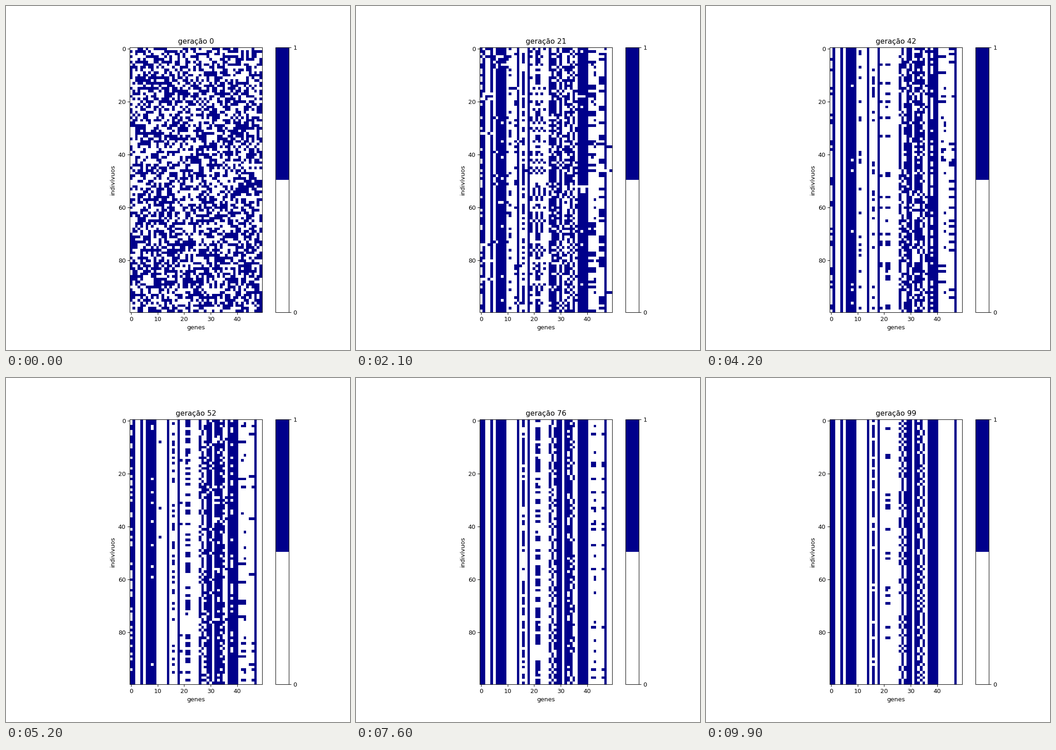
A matplotlib script that plays this animation: 748 by 748 pixels, repeating every 10000 ms.

```python
import numpy as np
import matplotlib.pyplot as plt
from matplotlib.animation import FuncAnimation
from matplotlib.colors import ListedColormap

SIZE, GENES, GENERATIONS = 100, 50, 100

# Generations at which the variant shares (in percent) are given.
KEYS = (13, 29, 42, 62, 76, 99)

# Linked genes: first gene, dominant variant (takes the remaining share),
# and the rival variants with their shares; missing values are zero.
LINKED = [
    (0, "11001", {"01001": (15, 60, 75, 18)}),
    (5, "011110", {"011010": (10, 5, 8), "101111": (5, 9)}),
    (11, "00010", {"10010": (25, 35, 17), "00110": (20, 12)}),
    (16, "10", {"00": (0, 60, 80, 50, 38, 15)}),
    (18, "10000000", {
        "10011000": (45, 15, 10, 67, 52, 20),
        "11011000": (0, 10, 12),
        "11010100": (25, 22),
        "10101010": (20, 11),
        "10010000": (0, 0, 3, 3, 5, 1),
    }),
    (26, "010110", {
        "101110": (10, 8, 25, 25, 33, 40),
        "100110": (5, 5, 20, 20, 17),
        "111010": (40, 45, 15),
        "011101": (15, 15, 8),
        "100101": (15, 15, 10),
    }),
    (32, "11010", {
        "10100": (10, 10, 10, 18, 20, 30),
        "11100": (10, 15, 25, 42, 45, 12),
        "11110": (20, 15, 25, 30, 5),
        "01010": (30, 30, 10),
        "00101": (15, 20, 15),
    }),
    (37, "1111", {"1011": (5, 5, 50, 15)}),
    (41, "000000", {
        "001000": (15, 5, 10, 20, 12),
        "011001": (0, 0, 4, 5, 10),
        "111000": (30, 20, 12),
        "010000": (0, 15, 8),
        "000011": (40, 20, 16),
    }),
    (47, "100", {}),
]

founders = np.random.default_rng(7).random((SIZE, GENES)) < 0.49


def share(values, gen):
    padded = values + (0,) * (len(KEYS) - len(values))
    return np.interp(gen, KEYS, padded) / 100


def population(gen):
    """Founders die out while selected variants spread and drift."""
    if gen == 0:
        return founders
    rng = np.random.default_rng(gen)
    wild = np.exp(-(gen / 12) ** 2)
    pool = 4 + int((SIZE - 4) * np.exp(-gen / 6))
    grid = np.empty((SIZE, GENES), bool)
    for start, main, rivals in LINKED:
        cols = slice(start, start + len(main))
        variants = np.array([[c == "1" for c in v] for v in (main, *rivals)])
        odds = [share(v, gen) for v in rivals.values()]
        pick = rng.choice(len(variants), SIZE, p=[1 - sum(odds), *odds])
        old = founders[rng.integers(pool, size=SIZE), cols]
        keep = rng.random((SIZE, 1)) < wild
        grid[:, cols] = np.where(keep, old, variants[pick])
    return grid


fig, ax = plt.subplots(figsize=(8, 8), dpi=93.5)
image = ax.imshow(founders.astype(int), cmap=ListedColormap(["white", "darkblue"]),
                  vmin=0, vmax=1, interpolation="nearest")
fig.colorbar(image, ax=ax, ticks=[0, 1])
ax.set_xlabel("genes")
ax.set_ylabel("indivívuos")
title = ax.set_title("geração 0")


def update(gen):
    image.set_data(population(gen).astype(int))
    title.set_text(f"geração {gen}")
    return image, title


anim = FuncAnimation(fig, update, frames=GENERATIONS, interval=100,
                     repeat=True, repeat_delay=0)
plt.show()
```
